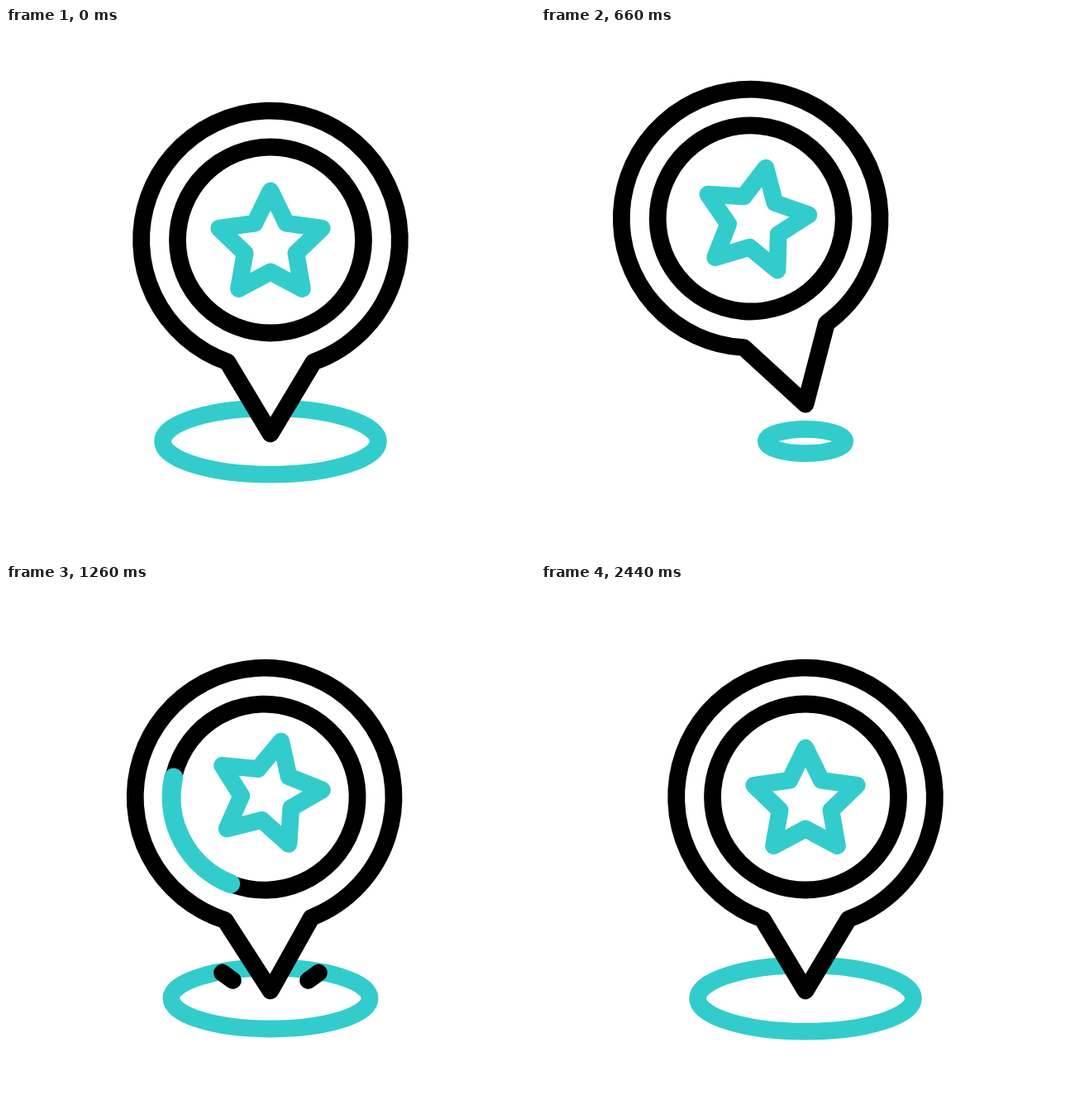
Write an HTML page with a canvas that moves like this. It is 640 px wide and 640 px high and loops after 3600 ms.

```html
<!DOCTYPE html>
<html lang="en">
<head>
<meta charset="utf-8">
<title>Star pin</title>
<style>
  html, body { margin: 0; width: 100%; height: 100%; overflow: hidden; background: #fff; }
  canvas { display: block; width: 100vw; height: 100vh; }
</style>
</head>
<body>
<canvas id="stage" width="640" height="640"></canvas>
<script>
const ctx = document.getElementById('stage').getContext('2d');
const LOOP = 3600, STEP = 20, END = 2440;
const TEAL = '#33cccc', BLACK = '#000', LINE = 20.8;
const TIP = { x: 320, y: 490.8 };
const HUB = -234.3;            // pin centre, measured from the tip
const RAD = Math.PI / 180;

// Key lists hold [time, value] pairs
const TILT = [[0, 0], [840, -18.65], [1085, 4], [1335, -3.4], [1585, 0]];
const RING = [[75, 1], [808, 0.29], [1078, 1.125], [1330, 0.873], [1585, 1]];
const SPIN = [[0, 0], [600, -48], [918, -6], [1840, -400], [2440, -360]];
const ARC_HEAD = [[695, 0], [1498, 360]];
const ARC_TAIL = [[880, 0], [1580, 360]];
const DASH_HEAD = [[1060, 0], [1420, 1]];
const DASH_TAIL = [[1120, 0], [1450, 1]];

const clamp = x => Math.min(1, Math.max(0, x));
const ease = x => x * x * (3 - 2 * x);
const mix = (a, b, k) => a + (b - a) * k;

function at(keys, t) {
  let value = keys[0][1];
  for (let i = 1; i < keys.length; i++) {
    const [t0, a] = keys[i - 1], [t1, b] = keys[i];
    if (t >= t0) value = mix(a, b, ease(clamp((t - t0) / (t1 - t0))));
  }
  return value;
}

function lift(t) {
  if (t < 720) return -39 * ease(Math.pow(t / 720, 2.3));
  return -39 * (1 - ease(clamp((t - 720) / 310)));
}

function stroke(color, width = LINE) {
  ctx.strokeStyle = color;
  ctx.lineWidth = width;
  ctx.stroke();
}

function drawRing(t) {
  const k = at(RING, t);
  ctx.beginPath();
  ctx.ellipse(320, 500, 130.4 * k, 40.2 * k, 0, 0, 2 * Math.PI);
  stroke(TEAL);
}

function drawDashes(t) {
  const head = at(DASH_HEAD, t), tail = at(DASH_TAIL, t);
  if (head - tail < 0.005) return;
  for (const side of [-1, 1]) {
    const point = k => [320 + side * mix(20, 86, k), mix(497, 449, k)];
    ctx.beginPath();
    ctx.moveTo(...point(tail));
    ctx.lineTo(...point(head));
    stroke(BLACK);
  }
}

function drawPin() {
  ctx.beginPath();
  ctx.arc(0, 0, 156.4, 109.5 * RAD, 430.5 * RAD);
  ctx.lineTo(0, -HUB);
  ctx.closePath();
  ctx.fillStyle = '#fff';
  ctx.fill();
  stroke(BLACK);
  ctx.beginPath();
  ctx.arc(0, 0, 112.5, 0, 2 * Math.PI);
  stroke(BLACK);
}

function drawArc(t) {
  const head = at(ARC_HEAD, t), tail = at(ARC_TAIL, t);
  if (head - tail < 0.2) return;
  ctx.beginPath();
  ctx.arc(0, 0, 112.5, (tail - 90) * RAD, (head - 90) * RAD);
  stroke(TEAL, 23);
}

function drawStar(t) {
  ctx.rotate(at(SPIN, t) * RAD);
  ctx.beginPath();
  for (let i = 0; i < 10; i++) {
    const r = i % 2 ? 32.5 : 65.5, a = (i * 36 - 90) * RAD;
    ctx.lineTo(r * Math.cos(a), 6 + r * Math.sin(a));
  }
  ctx.closePath();
  stroke(TEAL);
}

function draw(t) {
  ctx.fillStyle = '#fff';
  ctx.fillRect(0, 0, 640, 640);
  ctx.lineCap = ctx.lineJoin = 'round';
  drawRing(t);
  drawDashes(t);
  ctx.save();
  ctx.translate(TIP.x, TIP.y + lift(t));
  ctx.rotate(at(TILT, t) * RAD);
  ctx.translate(0, HUB);
  drawPin();
  drawArc(t);
  drawStar(t);
  ctx.restore();
}

const start = performance.now();
function tick() {
  const t = (performance.now() - start) % LOOP;
  draw(Math.min(END, Math.floor(t / STEP) * STEP));
  requestAnimationFrame(tick);
}
tick();
</script>
</body>
</html>
```
